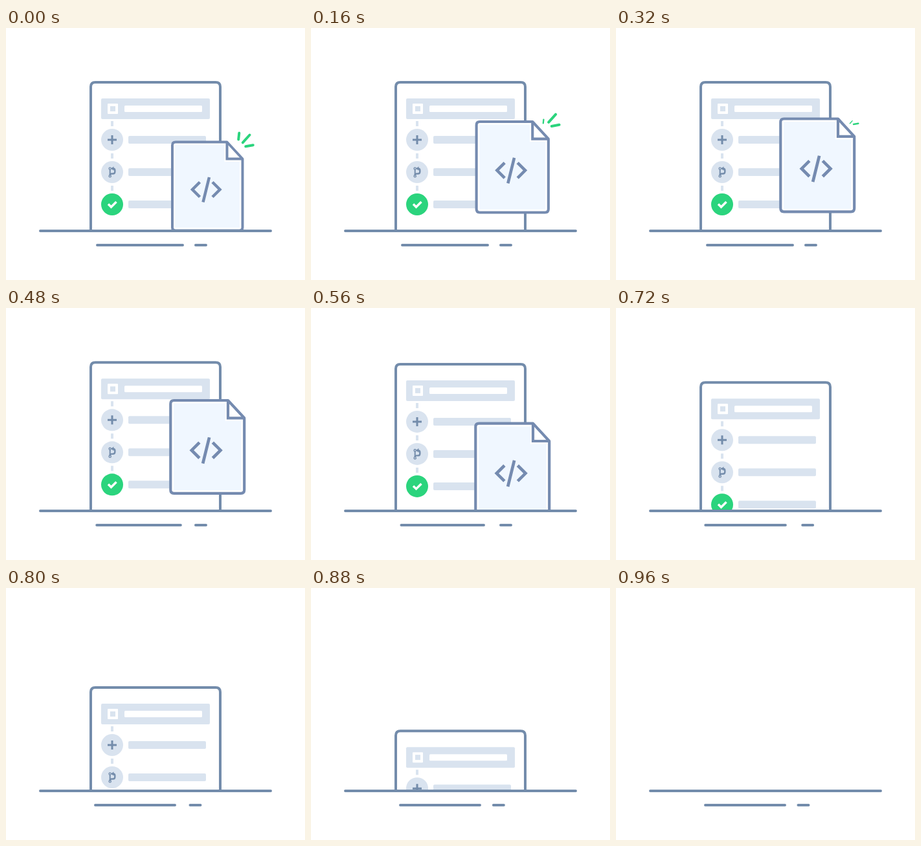
These frames come from a looping animation (462x390 px, 1 s). An HTML page:

```html
<!DOCTYPE html>
<html lang="en">
<head>
<meta charset="utf-8">
<title>Checklist and code file</title>
<style>
  html, body { margin: 0; width: 100%; height: 100%; overflow: hidden; background: #fff; }
  svg { display: block; width: 100%; height: 100%; }
  .line { fill: none; stroke: #738cab; stroke-width: 4; }
  .round { stroke-linecap: round; stroke-linejoin: round; }
  .soft { fill: #d9e3ef; }
  .white { fill: #fff; }
  .green { fill: #2bd47d; }
  .ray { stroke: #2bd47d; }
  .file { stroke: #758bb0; }
</style>
</head>
<body>
<svg viewBox="0 0 462 390">
  <clipPath id="above"><rect width="462" height="314"/></clipPath>
  <g clip-path="url(#above)">
    <g id="board">
      <path class="line white" style="fill:#fff" d="M131 330V91q0-7 7-7H324q7 0 7 7V330"/>
      <rect class="soft" x="147" y="109" width="168" height="32" rx="2"/>
      <rect class="white" x="157" y="117" width="16" height="16" rx="1"/>
      <rect class="soft" x="161" y="121" width="8" height="8"/>
      <rect class="white" x="183" y="120" width="120" height="10" rx="1.5"/>
      <path class="soft" d="M162 144h4v8h-4zM162 194h4v8h-4zM162 244h4v8h-4z"/>
      <g class="soft">
        <circle cx="164" cy="173" r="17"/>
        <circle cx="164" cy="223" r="17"/>
        <circle class="green" cx="164" cy="273" r="17"/>
        <rect x="189" y="167" width="120" height="12" rx="2"/>
        <rect x="189" y="217" width="120" height="12" rx="2"/>
        <rect x="189" y="267" width="120" height="12" rx="2"/>
      </g>
      <path class="line" stroke-width="3" style="stroke-width:3" d="M157 173h14M164 166v14"/>
      <g class="line" style="stroke-width:1.4">
        <circle cx="160.7" cy="217.5" r="1.6"/>
        <circle cx="160.7" cy="229.3" r="1.6"/>
        <path style="stroke-width:2" d="M160.7 219v9"/>
        <path style="stroke-width:2.4" d="M163.5 217.5h2q2.8 0 2.8 3v2q0 3-3 3h-2q-2.3 0-2.6 2"/>
        <path fill="#738cab" d="M163.5 217.5l2.2-1.8v3.6z"/>
      </g>
      <path class="line" style="stroke:#fff;stroke-width:3.5" d="M158 272.5l4.5 4.5 8-8"/>
    </g>

    <g id="doc">
      <g class="line round ray">
        <path class="beam" d="M360.3 162.5L359.2 172.5"/>
        <path class="beam" d="M376.5 165.5L365.8 177.3"/>
        <path class="beam" d="M381.8 181.2L370.3 183.3"/>
      </g>
      <path class="line file" style="fill:#fff" stroke-linejoin="round"
        d="M341.5 176.5H262q-5 0-5 5V308.5q0 5 5 5H360.5q5 0 5-5V202.5Z"/>
      <path fill="#f0f7ff" d="M261.5 181H337.5V207H361V309H261.5Z"/>
      <path class="line file" d="M341.5 176.5V202.5H365.5"/>
      <path class="line file" style="stroke-width:4.5" d="M299.5 238.5L288 250l11.5 11.5M319 238.5L330.500 250 319 261.500M314 231L304.500 269.500"/>
    </g>
  </g>
  <path class="line round" d="M53 314H409"/>
  <path class="line round" id="long"/>
  <path class="line round" id="short"/>
</svg>
<script>
  const $ = id => document.getElementById(id);
  const beams = document.querySelectorAll('.beam');
  const part = (t, a, b) => Math.min(1, Math.max(0, (t - a) / (b - a)));
  const smooth = p => p * p * (3 - 2 * p);
  const scaleAt = (x, y, s) => `translate(${x} ${y}) scale(${s}) translate(${-x} ${-y})`;

  function draw(t) {
    const sink = 11.3 * (Math.max(0, t - 363) / 277) ** 4;
    $('board').setAttribute('transform', `translate(0 ${sink})`);

    const rise = part(t, 40, 280);
    const drop = 155.5 * (Math.max(0, t - 426) / 214) ** 3;
    const y = drop - 36 * (1 - (1 - rise) ** 3);
    const size = 1 + 0.05 * smooth(rise);
    $('doc').setAttribute('transform', `translate(0 ${y}) ${scaleAt(311.3, 176.5, size)}`);

    // rays shrink one after another into the folded corner
    [80, 200, 248].forEach((start, i) => {
      const s = 1 - part(t, start, start + 180);
      beams[i].setAttribute('transform', scaleAt(355.7, 186.5, s));
      beams[i].style.display = s > 0 ? '' : 'none';
    });

    const a = smooth(part(t, 320, 800));
    const b = 11.5 * smooth(part(t, 560, 920));
    $('long').setAttribute('d', `M${141 - 3 * a} 336H${273 - 12 * a}`);
    $('short').setAttribute('d', `M${293 - b} 336H${309 - b}`);
  }

  function tick() {
    const t = Math.floor(performance.now() % 1000 / 40) * 40;
    draw(t < 80 ? 0 : t);
    requestAnimationFrame(tick);
  }
  tick();
</script>
</body>
</html>
```
